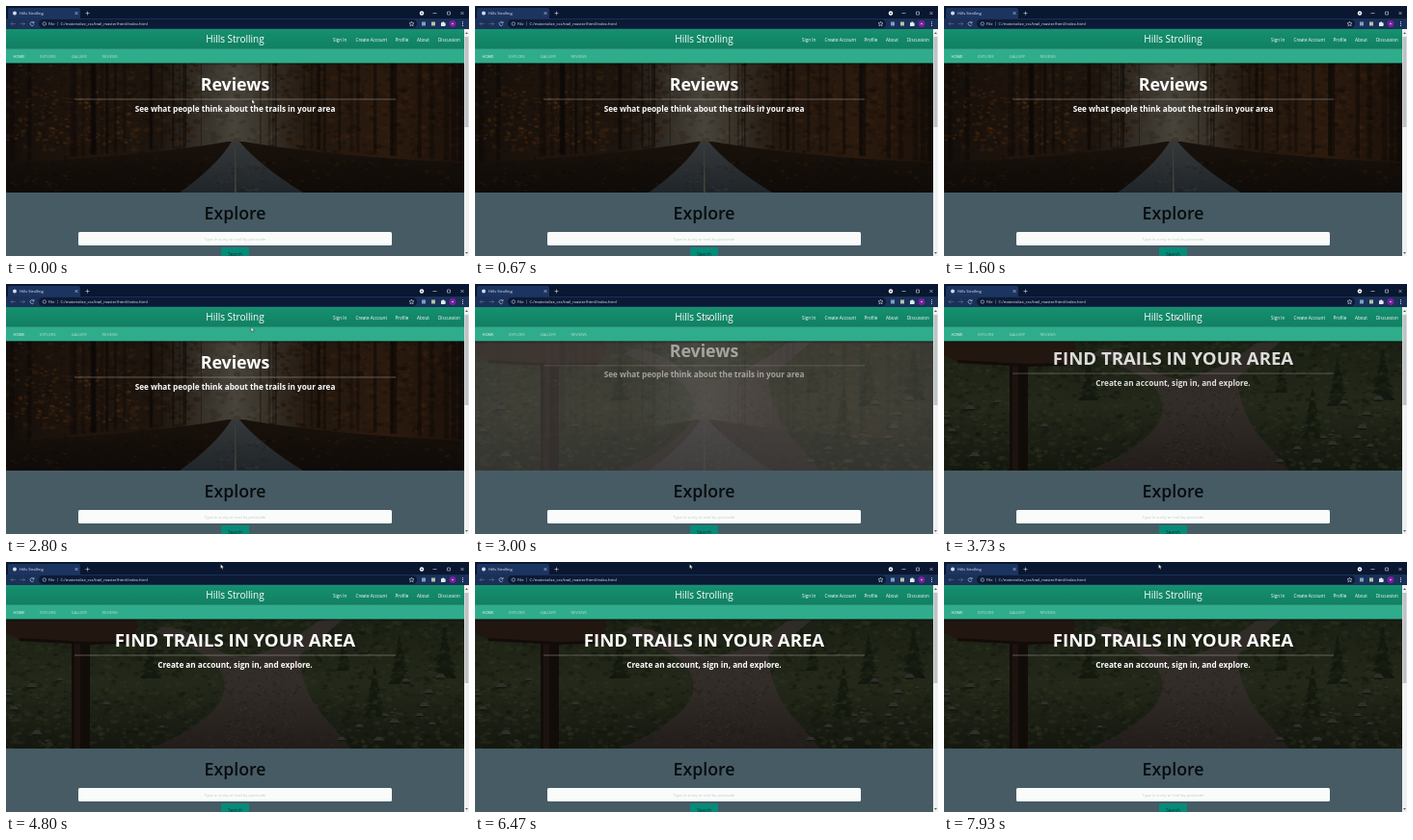
These frames come from a looping animation (480x260 px, 8000 ms). An HTML page with a canvas:

```html
<!DOCTYPE html>
<html lang="en">
<head>
<meta charset="utf-8">
<title>Hills Strolling</title>
<style>
  html, body { margin: 0; width: 100%; height: 100%; overflow: hidden; background: #465b64; }
  #stage { position: relative; width: 480px; height: 260px; overflow: hidden; }
  #slides { position: absolute; left: 0; top: 59px; width: 475px; height: 135px; background: #9e9e9e; }
  canvas, svg { position: absolute; left: 0; top: 0; display: block; }
  text { font-family: "Open Sans", "Noto Sans", sans-serif; }
  .small { font-size: 4.1px; fill: #e8eef6; }
  .link { font-size: 4.6px; font-weight: 500; fill: #fff; }
  .tab { font-size: 4px; fill: #fff; fill-opacity: .65; }
  .mid { text-anchor: middle; }
  .head { font-weight: 650; fill: #fff; }
  .sub { font-weight: 650; font-size: 8.2px; fill: #fff; }
  .rule { stroke: #fff; stroke-opacity: .5; stroke-width: .6; }
  .icon { fill: none; stroke: #cfd8e6; stroke-width: .6; }
</style>
</head>
<body>
<div id="stage">
  <div id="slides">
    <canvas id="road" width="475" height="135"></canvas>
    <canvas id="trail" width="475" height="135"></canvas>
  </div>
  <svg width="480" height="260" viewBox="0 0 480 260">
    <defs>
      <linearGradient id="navFill" x2="0" y2="1">
        <stop stop-color="#15916f"/><stop offset="1" stop-color="#117f62"/>
      </linearGradient>
      <linearGradient id="shade" x2="0" y2="1">
        <stop stop-opacity=".45"/><stop offset="1" stop-opacity="0"/>
      </linearGradient>
      <clipPath id="slideClip"><path d="M0 59H475V194H0z"/></clipPath>
    </defs>

    <g clip-path="url(#slideClip)">
      <g id="reviews" class="mid">
        <text class="head" x="237.5" y="88" font-size="17.8">Reviews</text>
        <path class="rule" d="M71 97H404"/>
        <text class="sub" x="237.5" y="109.5">See what people think about the trails in your area</text>
      </g>
      <g id="find" class="mid">
        <text class="head" x="237.5" y="88" font-size="18.6">FIND TRAILS IN YOUR AREA</text>
        <path class="rule" d="M71 97H404"/>
        <text class="sub" x="237.5" y="109.5">Create an account, sign in, and explore.</text>
      </g>
    </g>

    <!-- browser chrome -->
    <path d="M0 0H480V13H0z" fill="#0a1730"/>
    <path d="M2 13V4q0-2 2-2H75q2 0 2 2V13z" fill="#1c3460"/>
    <circle cx="9" cy="7.5" r="2" fill="#d5dce8"/>
    <text class="small" x="14" y="9">Hills Strolling</text>
    <path class="icon" d="M71.5 6l3 3m0-3l-3 3M82.5 7.5h4M84.5 5.500v4"/>
    <circle cx="431" cy="7.5" r="2.2" fill="#fff"/>
    <path d="M430 7h2l-1 1.4z" fill="#0a1730"/>
    <path class="icon" d="M442.5 7.5h4M457.5 6h3v3h-3zM471.5 6l3 3m0-3l-3 3"/>
    <path d="M0 13H480V24H0z" fill="#1a3058"/>
    <rect x="34" y="14" width="392" height="9" rx="4.5" fill="#0c1a36"/>
    <path class="icon" d="M10 18.5H5m2-2l-2 2 2 2" opacity=".4"/>
    <path class="icon" d="M14.5 18.5h5m-2-2l2 2-2 2" opacity=".4"/>
    <path class="icon" d="M28.800 17.500a2 2 0 1 0 .1 1.800M29 16v1.800h-1.800"/>
    <circle class="icon" cx="39.8" cy="18.5" r="1.7"/>
    <text class="small" x="44" y="20">File</text>
    <path d="M53.500 16.500v4" stroke="#7d8ba3" stroke-width=".5"/>
    <text class="small" x="56.5" y="20">C:/materialize_css/trail_master/html/index.html</text>
    <path class="icon" d="M420.500 16l.7 1.700 1.800.1-1.400 1.200.5 1.800-1.600-1-1.600 1 .5-1.800-1.400-1.200 1.800-.1z"/>
    <rect x="431" y="16.5" width="4" height="4" fill="#7c9fc0"/>
    <rect x="441" y="16.5" width="4" height="4" fill="#b3c5a3"/>
    <path d="M451 17.200h1.300a.9.9 0 0 1 1.800 0h1.300v1.300a.9.9 0 0 1 0 1.600v1h-4.400z" fill="#e4eaf3"/>
    <circle cx="463" cy="18.5" r="3.4" fill="#7d1fa2"/>
    <circle cx="463" cy="18.5" r=".8" fill="#ead8f0"/>
    <path d="M473.500 16.300v.9m0 1v.9m0 1v.9" stroke="#e4eaf3"/>

    <!-- page header -->
    <path d="M0 24H475V44.500H0z" fill="url(#navFill)"/>
    <path d="M0 44.500H475V59.500H0z" fill="#2fac8b"/>
    <path d="M0 59.500H475V62H0z" fill="url(#shade)"/>
    <text class="mid" x="237.5" y="38" font-size="10" fill="#fff">Hills Strolling</text>
    <g id="links"></g>

    <!-- search section -->
    <path d="M0 194H475V260H0z" fill="#465b64"/>
    <text class="mid" x="237.5" y="221.800" font-size="17.7" font-weight="600" fill="#080c0e">Explore</text>
    <rect x="75" y="235" width="325" height="14" rx="1.5" fill="#fafcfb"/>
    <text class="mid" x="237.5" y="243.600" font-size="4.2" fill="#c3c8ca">Type in a city or trail by postcode</text>
    <rect x="223" y="251" width="29" height="12" rx="1" fill="#078a78"/>
    <text class="mid" x="237.5" y="260" font-size="4.6" fill="#0b2f2b">Search</text>

    <!-- scrollbar -->
    <path d="M475 24H480V260H475z" fill="#f0f1f1"/>
    <path d="M475.500 32H479.500V126H475.500z" fill="#bfc2c3"/>
    <path d="M476 29l1.500-1.800L479 29zM476 256l1.500 1.800L479 256z" fill="#555"/>

    <path id="cursor" d="M0 0V4.600L1.100 3.700 1.900 5.300 2.600 5 1.900 3.400H3.300z" fill="#fff" stroke="#111" stroke-width=".35"/>
  </svg>
</div>
<script>
const $ = id => document.getElementById(id);
const LOOP = 8000;

function addLinks(cls, y, items) {
  for (const [label, x] of items) {
    const el = document.createElementNS("http://www.w3.org/2000/svg", "text");
    el.setAttribute("class", cls);
    el.setAttribute("x", x);
    el.setAttribute("y", y);
    el.textContent = label;
    if (label === "HOME") el.style.fillOpacity = 1;
    $("links").append(el);
  }
}
addLinks("link", 36.6, [["Sign In", 339], ["Create Account", 362.5], ["Profile", 403.5], ["About", 426], ["Discussion", 448]]);
addLinks("tab", 53.7, [["HOME", 7.5], ["EXPLORE", 35], ["GALLERY", 67.5], ["REVIEWS", 99.5]]);

function seeded(s) {
  return () => (s = (s * 16807) % 2147483647) / 2147483647;
}

function painter(id, seed) {
  const c = $(id).getContext("2d"), rnd = seeded(seed);
  const between = (a, b) => a + (b - a) * rnd();
  return {
    c, between,
    fill(color, path) { c.fillStyle = color; c.fill(new Path2D(path)); },
    fade(stops, x1, y1) {
      const g = c.createLinearGradient(0, 0, x1, y1);
      stops.forEach((s, i) => g.addColorStop(i / (stops.length - 1), s));
      return g;
    },
    blobs(n, colors, x0, y0, x1, y1, size, alpha) {
      for (let i = 0; i < n; i++) {
        c.globalAlpha = alpha * between(.5, 1);
        c.fillStyle = colors[Math.floor(rnd() * colors.length)];
        const r = size * between(.4, 1);
        c.beginPath();
        c.ellipse(between(x0, x1), between(y0, y1), r * 1.3, r * .8, 0, 0, 7);
        c.fill();
      }
      c.globalAlpha = 1;
    }
  };
}

function paintRoad() {
  const p = painter("road", 71), { c, between } = p;
  p.fill(p.fade(["#140e0a", "#20150d", "#1d150e", "#48443b", "#22180f", "#2b1a0e", "#1c110a"], 475, 0), "M0 0H475V135H0z");
  p.blobs(700, ["#3a2413", "#24170d", "#140e0a", "#1a120b"], 0, 0, 200, 95, 3, .5);
  p.blobs(700, ["#3a2210", "#2c1b0e", "#1c120b", "#150e09"], 275, 0, 475, 95, 3, .5);
  p.blobs(160, ["#4f4b40", "#373127", "#2a2218"], 195, 0, 280, 85, 3, .35);
  p.blobs(150, ["#5a3716", "#4a2c12"], 10, 30, 130, 85, 2, .5);
  for (let i = 0; i < 50; i++) {
    const d = between(0, 1), x = i % 2 ? 212 - d * 210 : 262 + d * 210;
    c.globalAlpha = between(.25, .6);
    p.fill("#0d0907", `M${x} 0h${1 + d * 4}V${85 + d * 18}h${-1 - d * 4}z`);
  }
  c.globalAlpha = 1;
  p.fill(p.fade(["#1c130c", "#1c130c", "#0f0b08"], 0, 135), "M0 104Q140 98 230 82H246Q340 98 475 104V135H0z");
  p.blobs(350, ["#2d1b0e", "#1a110a", "#0e0a07"], 0, 98, 475, 135, 2, .5);
  p.fill(p.fade(["#3b3e3f", "#3b3e3f", "#202529"], 0, 135), "M234 82H242Q264 108 308 135H180Q218 108 234 82z");
  p.blobs(120, ["#2b3034", "#1d2124", "#343839"], 214, 104, 268, 134, 2, .4);
  p.fill("#4b4839", "M237.500 88h.5l.6 47h-1.500z");
}

function pine(p, x, y, h) {
  for (let i = 0; i < 7; i++) {
    const w = h * (.05 + i * .03), top = y - h + i * h / 8;
    p.fill(i % 2 ? "#171d11" : "#13190f", `M${x} ${top}l${w} ${h / 4}H${x - w}z`);
  }
}

function paintTrail() {
  const p = painter("trail", 29), { c, between } = p;
  p.fill(p.fade(["#1b2014", "#23281a", "#14170f"], 0, 135), "M0 0H475V135H0z");
  [[150, 62, 48], [190, 20, 26], [382, 102, 54], [408, 68, 52], [350, 54, 36], [455, 62, 56]]
    .forEach(t => pine(p, ...t));
  p.blobs(2200, ["#2d3520", "#222b17", "#161c10", "#30331f", "#10140c"], 0, 0, 475, 135, 2.8, .5);
  p.fill(p.fade(["#2f2b27", "#332d29", "#221d1a"], 0, 135),
    "M163 8Q190 10 212 28Q228 40 250 40Q290 30 324 2L350 0Q328 20 304 38Q306 72 326 98Q342 116 358 135H150Q196 116 218 92Q238 66 212 42Q184 24 154 14z");
  p.blobs(700, ["#3d3732", "#1f1a18", "#2d2724"], 226, 42, 304, 135, 1.2, .5);
  p.blobs(160, ["#25231a", "#2d2724", "#1c1e14"], 160, 112, 345, 135, 2, .5);
  for (let i = 0; i < 30; i++) {
    const x = i % 2 ? between(0, 165) : between(345, 470), y = between(60, 132), r = between(2, 6);
    p.fill("#30302b", `M${x - r} ${y}l${r * .6} ${-r * .7}h${r * .9}l${r * .6} ${r * .8}z`);
    p.fill("#15170f", `M${x - r} ${y}h${r * 2.1}l${-r * .6} ${r * .3}h${-r}z`);
  }
  p.fill("#120c09", "M68 22H87V135H68z");
  p.fill("#1c130f", "M71 22H77V135H71z");
  p.fill("#211610", "M0 0H134L137 8 128 25 84 26 14 22 0 15z");
  p.fill("#130c09", "M14 20L84 24 128 23 127 26 84 27 14 23z");
}

paintRoad();
paintTrail();

const clamp = v => Math.min(1, Math.max(0, v));
const easeOut = p => 1 - (1 - p) * (1 - p);
const span = (t, start, length) => easeOut(clamp((t - start) / length));

// time, x, y: along the subtitle, up to the page title, then to the top edge
const path = [
  [0, 255, 97], [70, 255, 97], [870, 312, 105], [1130, 317.5, 105.5],
  [2130, 317.5, 105.5], [2330, 300, 86], [2530, 290, 76], [2900, 241, 33.5],
  [3730, 241, 33.5], [4130, 222.5, 2.2], [LOOP, 222.5, 2.2]
];

function along(keys, t) {
  const i = Math.max(1, keys.findIndex(k => k[0] >= t));
  const [a, b] = [keys[i - 1], keys[i]];
  const f = clamp((t - a[0]) / (b[0] - a[0]));
  return [a[1] + (b[1] - a[1]) * f, a[2] + (b[2] - a[2]) * f];
}

function caption(id, shown) {
  $(id).style.opacity = shown;
  $(id).setAttribute("transform", `translate(0 ${-25 * (1 - shown)})`);
}

function draw(now) {
  const t = now % LOOP;
  const swap = span(t, 2860, 500);
  $("road").style.opacity = 1 - swap;
  $("trail").style.opacity = swap;
  caption("reviews", 1 - swap);
  caption("find", span(t, 3430, 500));
  const [x, y] = along(path, t);
  $("cursor").setAttribute("transform", `translate(${x} ${y})`);
  requestAnimationFrame(draw);
}
draw(performance.now());
</script>
</body>
</html>
```
